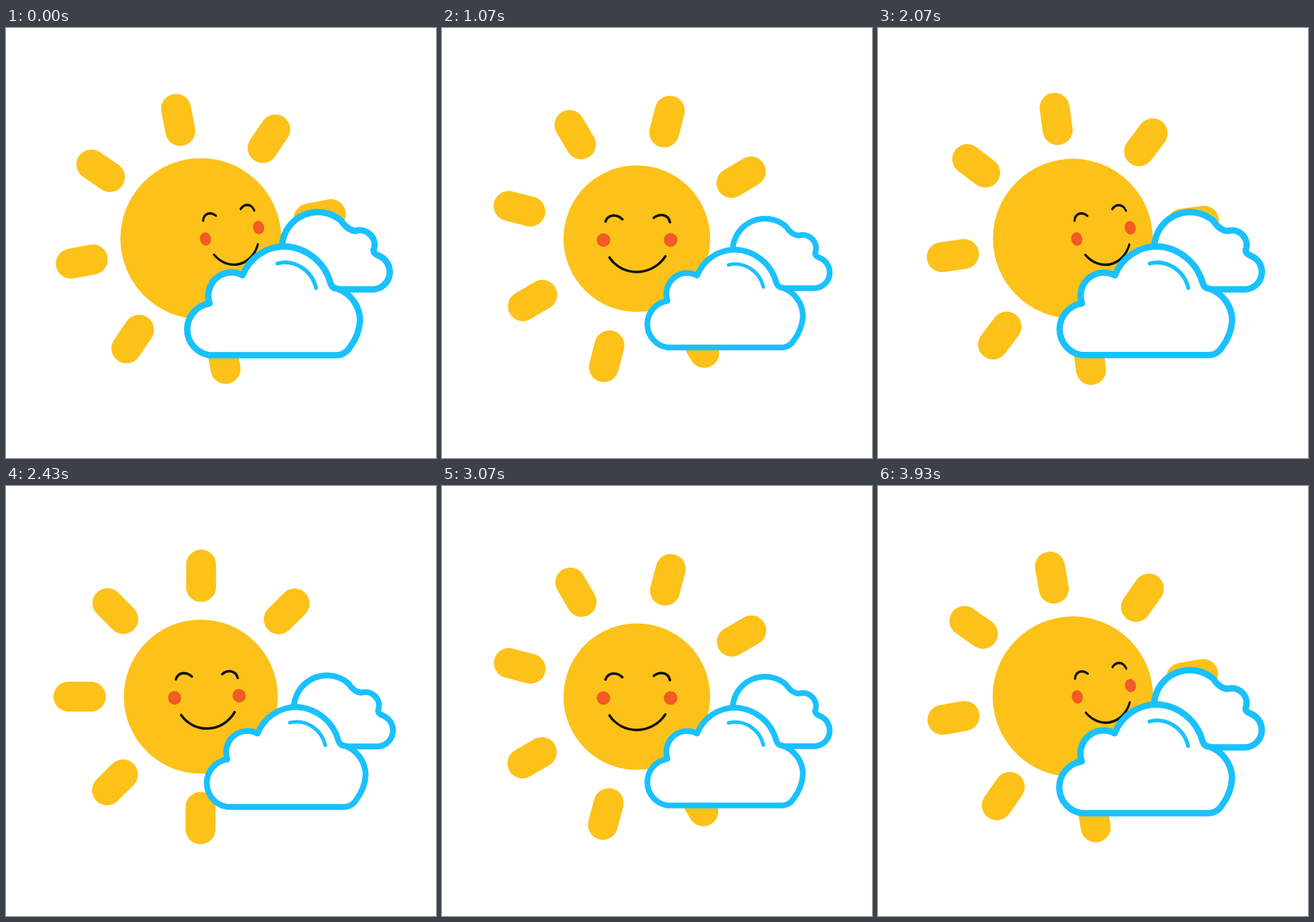
Recreate the animation shown at these times as an HTML page. Size 640 by 640 pixels, loop 4000 ms.

```html
<!DOCTYPE html>
<html lang="en">
<head>
<meta charset="utf-8">
<title>Sun and clouds</title>
<style>
  html, body { margin: 0; width: 100%; height: 100%; overflow: hidden; background: #fff; }
  svg { display: block; width: 100%; height: 100%; }
  path { stroke-linecap: round; stroke-linejoin: round; }
  #rays { stroke: #fcc219; stroke-width: 44.6; }
  #sun { fill: #fcc219; }
  #face path { fill: none; stroke: #111; stroke-width: 3.8; }
  #face circle { fill: #f25b24; }
  #clouds path { fill: #fff; stroke: #19c1ff; stroke-width: 9.5; }
  #clouds .shine { fill: none; stroke-width: 5.8; }
</style>
</head>
<body>
<svg viewBox="0 0 640 640">
  <path id="rays"/>
  <circle id="sun" cx="290" cy="313.5"/>
  <g id="face">
    <circle cx="-50" r="10.2"/>
    <circle cx="50" r="10.2"/>
    <path d="M-47 -27.6C-43 -38.5 -30 -39 -22 -31"/>
    <path d="M25 -33C33 -39.5 46 -39 49 -26.6"/>
    <path d="M-41 26C-22 55 22 55 42 24.4"/>
  </g>
  <g id="clouds">
    <path d="M411 322A53.3 53.3 0 0 1 499 287Q508 301 520 302A22 22 0 0 1 547 331Q547 336 555 339A26 26 0 0 1 547 389H490"/>
    <path d="M303 487A38.9 38.9 0 0 1 303 410A34.6 34.6 0 0 1 352 368A68 68 0 0 1 415 325A74 74 0 0 1 483 380Q486 388 493 388A51 51 0 0 1 527 435A75 75 0 0 1 512 475A24 24 0 0 1 492 487Z"/>
    <path class="shine" d="M404 350.5C429 344 455 360 461.5 387"/>
  </g>
</svg>
<script>
const LOOP = 4000, STEPS = 56, HALF = 14;
const $ = id => document.getElementById(id);
const mix = (a, b, v) => a.map((n, i) => n + (b[i] - n) * v);
const setTransform = (id, value) => $(id).setAttribute('transform', value);

// The face is one flat drawing, skewed when it looks aside
const ASIDE = [0.791, -0.17, 0.215, 0.965, 336.5, 305.5];
const AHEAD = [1, 0, 0, 1, 290.2, 315.6];

let rays = '';
for (let a = 0; a < 2 * Math.PI; a += Math.PI / 4) {
  const x = Math.sin(a), y = Math.cos(a);
  rays += `M${163.6 * x} ${163.6 * y}L${197 * x} ${197 * y}`;
}
$('rays').setAttribute('d', rays);

// cubic-bezier(.45, 0, 0, 1)
function ease(x) {
  let lo = 0, hi = 1, s;
  for (let i = 0; i < 24; i++) {
    s = (lo + hi) / 2;
    if (1.35 * s * (1 - s) ** 2 + s ** 3 < x) lo = s; else hi = s;
  }
  return s * s * (3 - 2 * s);
}

function draw(now) {
  const step = Math.floor((now + 5) * STEPS / LOOP) % STEPS;
  const phase = (step + 0.3) % (2 * HALF);
  const swing = 1 - Math.abs(1 - phase / HALF);
  const v = ease(swing);
  const angle = -10.78 + 1.652 * step + 0.42 * Math.sin(2 * Math.PI * step / STEPS);

  setTransform('rays', `translate(290 313.9) rotate(${angle})`);
  $('sun').setAttribute('r', 120 - 12 * swing);
  setTransform('face', `matrix(${mix(ASIDE, AHEAD, v)})`);
  setTransform('clouds', `translate(${63 * v} ${37.2 * v}) scale(${1 - 0.1 * v})`);
}

let start;
function tick() {
  const now = performance.now();
  start ??= now;
  draw(now - start);
  requestAnimationFrame(tick);
}
tick();
</script>
</body>
</html>
```
